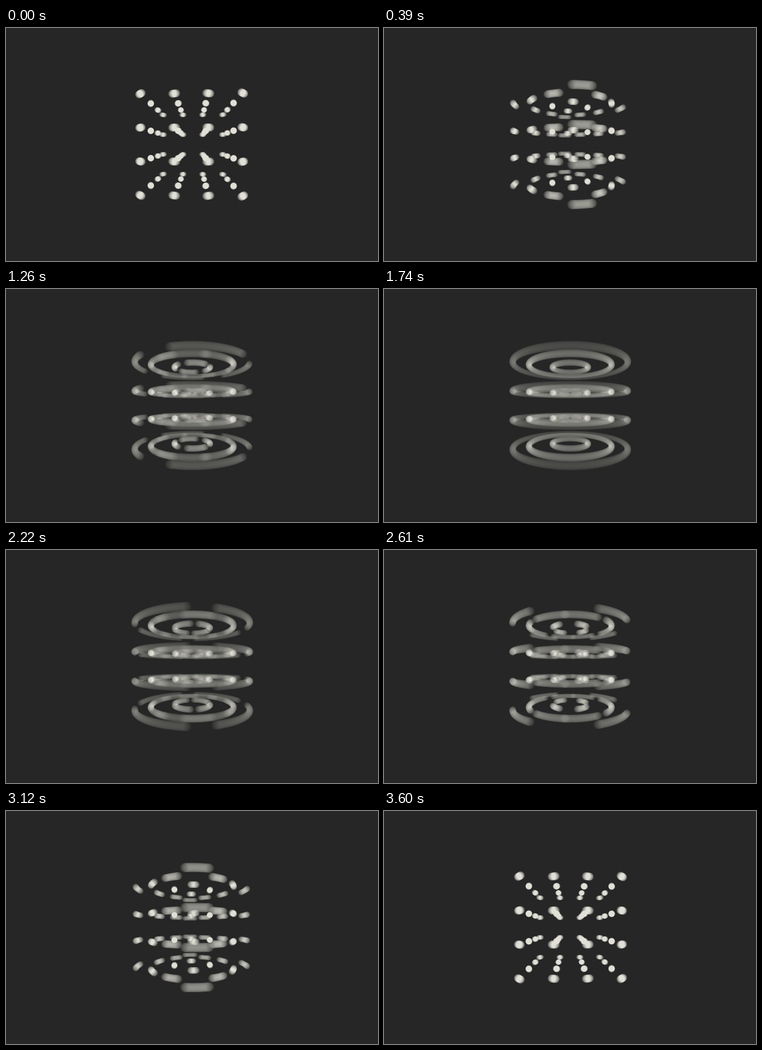
An HTML page with a canvas for the animation above (3.63 s loop, 636 px wide and 400 px high).

```html
<!DOCTYPE html>
<html lang="en">
<head>
<meta charset="utf-8">
<title>Spinning lattice</title>
<style>
  html, body { margin: 0; height: 100%; overflow: hidden; background: #262626; }
  canvas { position: absolute; left: 208px; top: 84px; }
</style>
</head>
<body>
<canvas width="222" height="232"></canvas>
<script>
const FRAMES = 121, FRAME_MS = 30, SAMPLES = 60;
const TOTAL_TURN = 8 * Math.PI;
const SHUTTER_START = -1.2, SHUTTER = 3.7; // in frames
const FOCAL = 244, CAMERA = 5.67, DOT = 0.118;
const BACK = [38, 38, 38], LIGHT = [224, 224, 214], GAMMA = 2.2;

const canvas = document.querySelector('canvas');
const ctx = canvas.getContext('2d');
const { width, height } = canvas;
const centerX = 318.4 - 208, centerY = 200 - 84;
const image = ctx.createImageData(width, height);
const layer = new Float32Array(width * height);
const total = new Float32Array(width * height);

const steps = [-1.5, -0.5, 0.5, 1.5];
const dots = steps.flatMap(x => steps.flatMap(y => steps.map(z => [x, y, z])));

// Average exposures in linear light, then return to display values.
const palette = Array.from({ length: 1025 }, (_, i) => BACK.map((b, c) => {
  const dark = (b / 255) ** GAMMA, bright = (LIGHT[c] / 255) ** GAMMA;
  return 255 * (dark + (bright - dark) * i / 1024) ** (1 / GAMMA);
}));

// A gentle start that builds into a fast spin, mirrored in the second half.
const rise = v => 0.315 * v ** 1.3 + 0.685 * v ** 3.3;
const ease = u => u < 0.5 ? rise(2 * u) / 2 : 1 - rise(2 - 2 * u) / 2;

function turnAt(frame) {
  const u = frame / FRAMES, whole = Math.floor(u);
  return TOTAL_TURN * (whole + ease(u - whole));
}

function stamp(cx, cy, r) {
  const x1 = Math.ceil(cx + r), y1 = Math.ceil(cy + r);
  for (let y = Math.floor(cy - r - 1); y <= y1; y++) {
    for (let x = Math.floor(cx - r - 1); x <= x1; x++) {
      const cover = Math.min(1, r + 0.5 - Math.hypot(x + 0.5 - cx, y + 0.5 - cy));
      if (cover <= 0) continue;
      const p = y * width + x;
      layer[p] = Math.max(layer[p], cover < 1 ? cover ** GAMMA : 1);
    }
  }
}

function expose(turn) {
  const cos = Math.cos(turn), sin = Math.sin(turn);
  layer.fill(0);
  for (const [x, y, z] of dots) {
    const scale = FOCAL / (CAMERA - x * sin - z * cos);
    stamp(centerX + (x * cos - z * sin) * scale, centerY + y * scale, DOT * scale);
  }
  for (let p = 0; p < total.length; p++) total[p] += layer[p];
}

function draw(frame) {
  const from = turnAt(frame + SHUTTER_START);
  const to = turnAt(frame + SHUTTER_START + SHUTTER);
  const sweep = Math.min(to - from, Math.PI / 2); // a quarter turn closes the rings

  total.fill(0);
  for (let i = 0; i < SAMPLES; i++) expose(from + sweep * (i + 0.5) / SAMPLES);
  for (let p = 0; p < total.length; p++) {
    const color = palette[Math.round(total[p] / SAMPLES * 1024)];
    for (let c = 0; c < 3; c++) image.data[4 * p + c] = color[c];
    image.data[4 * p + 3] = 255;
  }
  ctx.putImageData(image, 0, 0);
}

let shown = -1;
function tick() {
  const frame = Math.floor(performance.now() / FRAME_MS) % FRAMES;
  if (frame !== shown) draw(shown = frame);
  requestAnimationFrame(tick);
}
tick();
</script>
</body>
</html>
```
